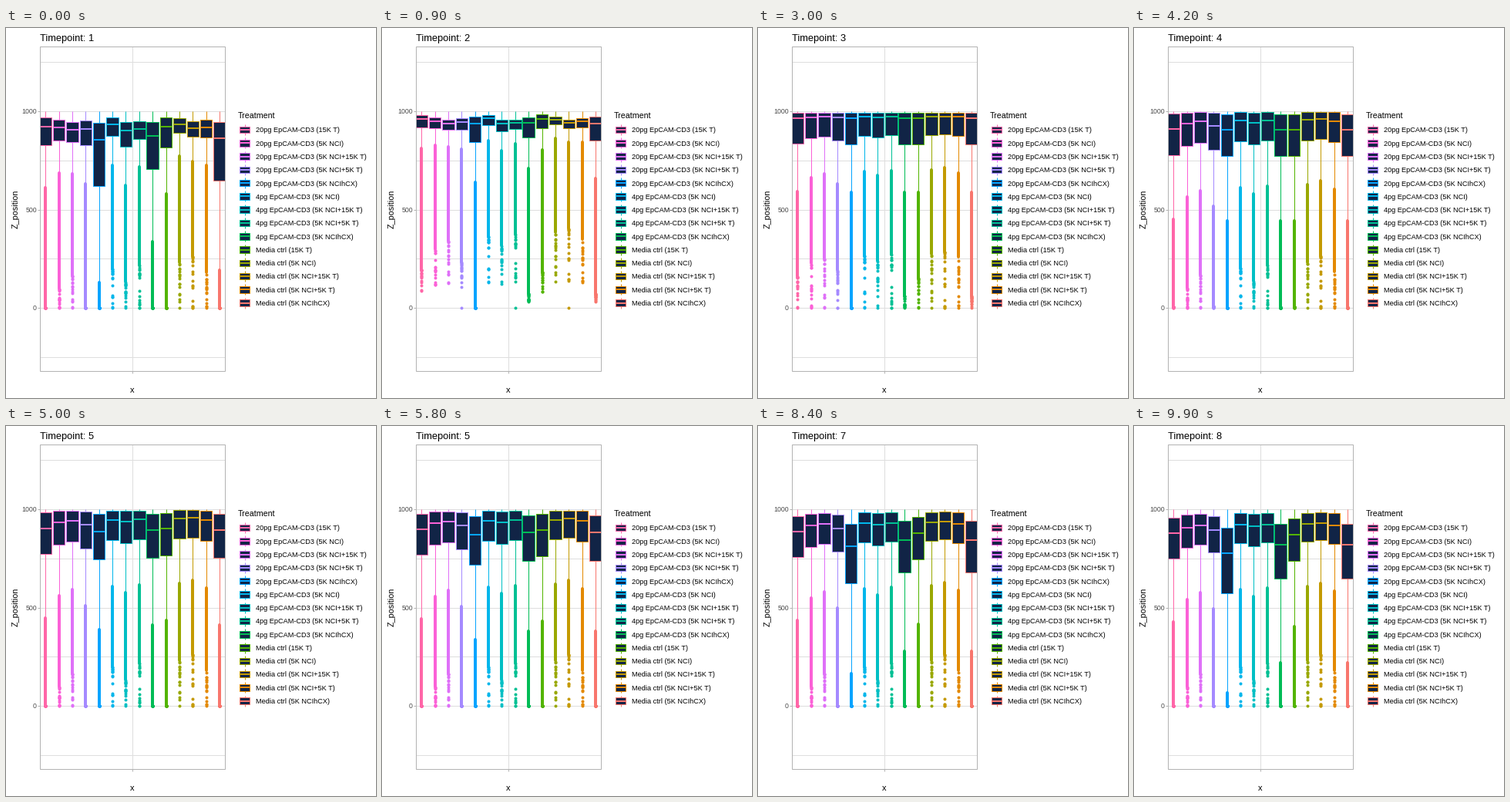
Write a matplotlib script that moves like this. It is 480 px wide and 480 px high and loops after 10 s.

```python
import numpy as np
import matplotlib.pyplot as plt
from matplotlib.animation import FuncAnimation
from matplotlib.patches import Rectangle

FRAMES, INTERVAL = 100, 100
DPI = 96
PX = 72 / DPI  # one pixel in points

plt.rcParams["font.family"] = "Liberation Sans"

NAVY, GRID, BORDER = "#112446", "#DEDEDE", "#B3B3B3"
LEFT, RIGHT, TOP, BOTTOM = 44, 284, 24, 445
Y1000, Y0 = 108, 363

COLORS = ["#FF66A8", "#FB61D7", "#DF70F8", "#A58AFF", "#06A4FF", "#00B6EB", "#00BFC4",
          "#00C094", "#00BC56", "#53B400", "#99A800", "#C49A00", "#E38900", "#F8766D"]
MIXES = ["5K NCI", "5K NCI+15K T", "5K NCI+5K T", "5K NCIhCX"]
LABELS = (["20pg EpCAM-CD3 (15K T)"]
          + [f"20pg EpCAM-CD3 ({m})" for m in MIXES]
          + [f"4pg EpCAM-CD3 ({m})" for m in MIXES]
          + ["Media ctrl (15K T)"]
          + [f"Media ctrl ({m})" for m in MIXES])

# Depth of each group's lower quartile below 1000, in pixels, at both ends of the run.
START = [44, 38, 40, 44, 97, 32, 46, 36, 75, 47, 28, 33, 34, 90]
END = [64, 50, 46, 56, 109, 44, 48, 43, 90, 67, 42, 40, 45, 90]

TIMES = [1, 2, 3, 4, 8]


def group_path(i):
    """Depths of (Q3, median, Q1) and heights of (gap, lowest) at each of TIMES."""
    start, end = START[i], END[i]
    mid = 0.9 * min(end, 65)
    wave = 4 * np.cos(1.37 * (i - 2))
    q3 = [6 + 0.12 * start + 0.8 * wave, 6 + wave, 2,
          0.5 + max(0, 0.13 * (mid - 35)), 4 + 0.29 * (end - 40)]
    median = [8 + 0.33 * start + 0.8 * wave, 7.5 + wave, 6.5,
              0.62 * mid - 12, 0.57 * end - 5]
    q1 = [start, 11.5 + wave, 10 + 0.52 * mid, mid, end]
    # The outliers thin out most while the boxes are narrow.
    base, wide = max(0, 4.2 * (56 - end)), max(0, 1.9 * (105 - end))
    gap = [base, wide, 0.6 * wide, base, base]
    lowest = [0, 0.45 * wide, 0, 0, 0]
    return q3, median, q1, gap, lowest


fig = plt.figure(figsize=(480 / DPI, 480 / DPI), dpi=DPI, facecolor="white")
ax = fig.add_axes([0, 0, 1, 1])
ax.set(xlim=(0, 480), ylim=(480, 0))
ax.axis("off")
panel = Rectangle((LEFT, TOP), RIGHT - LEFT, BOTTOM - TOP, fc="none", ec=BORDER,
                  lw=PX, zorder=9)
ax.add_patch(panel)


def line(xs, ys, color, width=1, clip=None, **kw):
    kw.setdefault("solid_capstyle", "butt")
    art, = ax.plot(xs, ys, color=color, lw=width * PX, **kw)
    if clip is not None:
        art.set_clip_path(clip)
    return art


def text(x, y, s, size, color="black", **kw):
    return ax.text(x, y, s, fontsize=size * PX, color=color, **kw)


def box(x, y, w, h, color, **kw):
    return ax.add_patch(Rectangle((x, y), w, h, fc=NAVY, ec=color, lw=PX, **kw))


def draw_frame():
    step = (Y0 - Y1000) / 4
    for k in range(-1, 6):
        y = Y0 - k * step
        line([LEFT, RIGHT], [y, y], GRID, zorder=1)
        if k in (0, 2, 4):
            line([LEFT - 3, LEFT], [y, y], BORDER)
            text(39.8, y + 3.4, str(250 * k), 8.8, "#4D4D4D", ha="right",
                 va="baseline")
    line([164, 164], [TOP, BOTTOM], GRID, zorder=1)
    line([164, 164], [BOTTOM, BOTTOM + 3], BORDER)
    text(164, 472.8, "x", 11, ha="center", va="baseline")
    text(13, 235, "Z_position", 10.8, rotation=90, ha="center", va="center")


def draw_legend():
    text(300.8, 117, "Treatment", 10.6, va="baseline")
    for i, (c, s) in enumerate(zip(COLORS, LABELS)):
        y = 132 + 17.28 * i
        line([310, 310], [y - 7, y + 7], c, zorder=2)
        box(303, y - 4.3, 13, 8.6, c, zorder=3)
        line([303.5, 316.5], [y, y], c, 2, zorder=4)
        text(324, y + 3.4, s, 9.15, va="baseline")


class Group:
    WIDTH = 15.5

    def __init__(self, i, color):
        self.path = group_path(i)
        self.x = 51.2 + 17.37 * i
        self.left = self.x - self.WIDTH / 2
        self.whisker = line([], [], color, clip=panel, zorder=2)
        self.column = line([], [], color, 4, clip=panel, zorder=3,
                           solid_capstyle="round")
        self.dots = line([], [], color, 0, clip=panel, zorder=3, marker="o",
                         ms=4 * PX, mew=0)
        self.box = box(self.left, 0, self.WIDTH, 1, color, zorder=4)
        self.box.set_clip_path(panel)
        self.median = line([], [], color, 2, clip=panel, zorder=5)
        rng = np.random.default_rng(20 + i)
        self.spread = np.append(rng.random(16) ** 1.4, 1)
        self.strays = [Y0] if i % 4 == 3 else []

    def update(self, t):
        q3, med, q1, gap, lowest = (np.interp(t, TIMES, p) for p in self.path)
        q3, med, q1 = (Y1000 + max(0, d) for d in (q3, med, q1))
        fence = q1 + 1.5 * (q1 - q3) + 2
        solid, bottom = Y0 - gap, Y0 - lowest
        x = self.x
        self.whisker.set_data([x, x], [Y1000 - 0.5, fence])
        self.column.set_data([x, x], [fence, max(fence, solid)])
        ys = np.append(solid + (bottom - solid) * self.spread, self.strays)
        self.dots.set_data(np.full(len(ys), x), ys)
        self.box.set_y(q3)
        self.box.set_height(q1 - q3)
        self.median.set_data([self.left, self.left + self.WIDTH], [med, med])


draw_frame()
draw_legend()
title = text(43.5, 17.3, "", 12.9, va="baseline")
groups = [Group(i, c) for i, c in enumerate(COLORS)]


def update(frame):
    t = 1 + 7 * frame / (FRAMES - 1)
    title.set_text(f"Timepoint: {round(t)}")
    for group in groups:
        group.update(t)
    return []


anim = FuncAnimation(fig, update, frames=FRAMES, interval=INTERVAL,
                     init_func=lambda: update(0), repeat=True, repeat_delay=0)
plt.show()
```
